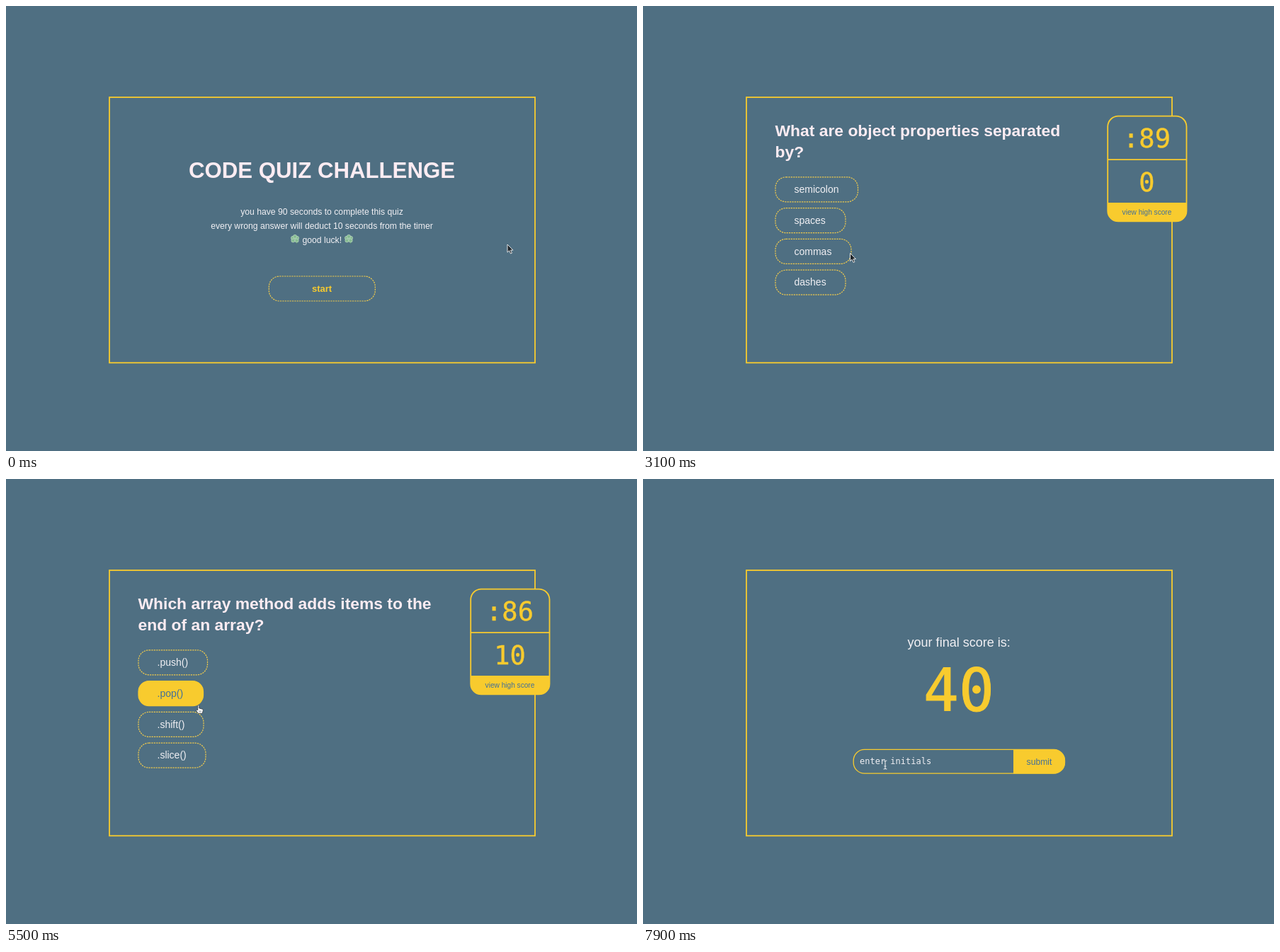
These frames come from a looping animation (891 px wide and 629 px high, 8 s). An HTML page:

```html
<!DOCTYPE html>
<html lang="en">
<head>
<meta charset="utf-8">
<title>Code quiz</title>
<style>
  html, body { margin: 0; width: 100%; height: 100%; overflow: hidden; background: #4f6f82; }
  svg { display: block; width: 891px; height: 629px; font-family: "Liberation Sans", Arial, sans-serif; cursor: default; }
  text { fill: #f1f0f4; white-space: pre; }
  .bold { font-weight: 700; }
  .head { fill: #fcecf2; }
  .gold { fill: #f8cb2e; }
  .blue { fill: #42709a; }
  .note { fill: #f8cb2e; font-weight: 700; font-style: italic; }
  .mono { font-family: "DejaVu Sans Mono", monospace; }
  .digits { fill: #f8cb2e; stroke: #f8cb2e; stroke-width: .012em; }
  .line { fill: none; stroke: #f8cb2e; stroke-width: 1.8; }
  .btn rect { fill: none; stroke: #f0ca4c; stroke-width: 1.2; stroke-dasharray: 2.2 1.2; }
  .btn.on rect { fill: #f8cb2e; stroke: #f8cb2e; stroke-dasharray: none; }
  .btn.on text { fill: #42709a; }
</style>
</head>
<body>
<svg id="stage" viewBox="0 0 891 629">
  <rect class="line" x="146" y="129" width="601" height="375.3"/>
  <g id="intro"></g>
  <g id="first"></g>
  <g id="second"></g>
  <g id="panel"></g>
  <g id="final"></g>
  <g id="arrow"><path d="M0 0V11.2L2.6 8.8 4.5 13 6.4 12.2 4.6 8.1H8Z" fill="#20262b" stroke="#f4f4f4" stroke-width=".9"/></g>
  <g id="hand"><path d="M-1 1Q0-.6 1 1V4.6L5.6 5.8Q6.8 6.2 6.4 8L5.4 12H-.4L-3.6 7.4Q-3.4 5.8-1 7.4Z" fill="#fff" stroke="#30383e" stroke-width=".8"/><path d="M1.2 8V10.4M3.2 8V10.4" stroke="#30383e" stroke-width=".6"/></g>
  <g id="beam"><path d="M-2.4-6Q0-6 0-4.4 0-6 2.4-6M0-4.6V4.6M-2.4 6Q0 6 0 4.4 0 6 2.4 6M-1.5 2H1.5" fill="none" stroke="#e8eaec" stroke-width="1.1"/></g>
</svg>
<script>
const LOOP = 8000, STEP = 100;
const $ = id => document.getElementById(id);

const text = (x, y, size, str, cls = '', anchor = 'start', id = '') =>
  `<text x="${x}" y="${y}" font-size="${size}" class="${cls}" text-anchor="${anchor}" id="${id}">${str.replace(/>/g, '&gt;')}</text>`;

const button = (id, x, y, w, label) =>
  `<g class="btn" id="${id}"><rect x="${x}" y="${y}" width="${w}" height="35" rx="15"/>${label}</g>`;

const clover = x => `<g transform="translate(${x} 329.5)">
  <path d="M0 0Q1 4 3 6" stroke="#5d9a6c" stroke-width="1.3" fill="none"/>` +
  [[-3, -1.6], [3, -1.6], [0, -3.6], [-2.6, 2], [2.6, 2]]
    .map(([a, b]) => `<circle cx="${a}" cy="${b}" r="2.6" fill="#86bb92" stroke="#d3e6d5" stroke-width=".5"/>`).join('') + '</g>';

const face = (x, mouth) => `<g transform="translate(${x} 433) skewX(-12)">
  <circle r="6.4" fill="#f6c443"/>
  <path d="M-4-1Q-2.6 .6-1.2-1M1.6-1Q3 .6 4.4-1M-2 ${mouth}" fill="none" stroke="#6b4a22" stroke-width="1.1"/></g>`;

const question = (lines, prefix, options) =>
  lines.map((s, i) => text(186.5, 183.6 + i * 30, 22.87, s, 'bold head')).join('') +
  options.map(([s, w], i) => {
    const y = 241.8 + i * 43.8;
    return button(prefix + i, 187, y, w, text(213.5, y + 22.2, 14, s));
  }).join('');

$('intro').innerHTML =
  text(446, 243.3, 31.2, 'CODE QUIZ CHALLENGE', 'bold head', 'middle') +
  text(446, 294.8, 12.2, 'you have 90 seconds to complete this quiz', '', 'middle') +
  text(446, 314.8, 12.2, 'every wrong answer will deduct 10 seconds from the timer', '', 'middle') +
  text(446.3, 334.6, 12.2, 'good luck!', '', 'middle') + clover(408) + clover(484) +
  button('start', 371.3, 382, 150, text(446, 403.7, 13, 'start', 'bold gold', 'middle'));

$('first').innerHTML =
  question(['What are object properties separated', 'by?'], 'a',
    [['semicolon', 116.5], ['spaces', 99], ['commas', 107], ['dashes', 99]]) +
  `<g id="right">${text(198, 438.3, 15.2, '>>> correct!!', 'note')}${face(303, '2Q0 5 2.4 2')}</g>`;

$('second').innerHTML =
  question(['Which array method adds items to the', 'end of an array?'], 'b',
    [['.push()', 97.5], ['.pop()', 91.5], ['.shift()', 92], ['.slice()', 95]]) +
  `<g id="wrong">${text(201.5, 438.3, 15.3, '>>> wrong!!', 'note')}${face(301.5, '4Q0 2 2.4 4')}</g>`;

$('panel').innerHTML =
  `<rect x="656.2" y="155.6" width="111.3" height="148.8" rx="15" fill="#4f6f82"/>
   <path class="gold" d="M656 278H768V290A15 15 0 0 1 753 305H671A15 15 0 0 1 656 290Z"/>
   <rect class="line" x="656.2" y="155.6" width="111.3" height="148.8" rx="15"/>
   <path class="line" d="M656 217.2H767.5"/>` +
  text(711.5, 200.3, 37, '', 'mono digits', 'middle', 'timer') +
  text(711.5, 262, 37, '', 'mono digits', 'middle', 'score') +
  text(711.5, 294.7, 10.15, 'view high score', 'blue', 'middle');

$('final').innerHTML =
  text(446.2, 237.2, 18.05, 'your final score is:', '', 'middle') +
  text(446, 327.6, 83, '40', 'mono digits', 'middle') +
  `<path class="gold" d="M523 382H580A16 16 0 0 1 596 398V400.5A16 16 0 0 1 580 416.5H523Z"/>
   <rect class="line" x="297.2" y="382.4" width="298.3" height="33.8" rx="15.5" style="stroke-width:1.3"/>` +
  text(306, 403.2, 12, 'enter initials', 'mono') +
  text(559.5, 403.6, 12.2, 'submit', 'blue', 'middle');

// Pointer path: time, x, y
const path = [
  [0, 708, 337], [400, 545, 385], [700, 500, 400], [1700, 500, 400],
  [2200, 489, 392], [2600, 459, 378], [3100, 292.5, 349.5], [3300, 266, 350],
  [4000, 266, 350], [4500, 269, 351], [4700, 269, 351], [4800, 289.5, 353],
  [5100, 291, 349], [5600, 267, 312], [5700, 265, 309], [6300, 265, 309],
  [6400, 245, 399], [6600, 245, 399], [7000, 248, 402], [7200, 248, 402],
  [7600, 304, 402], [7900, 342, 404]
];
const shapes = [[0, 'arrow'], [500, 'hand'], [1800, 'arrow'], [3200, 'hand'],
  [4800, 'arrow'], [5400, 'hand'], [6400, 'arrow'], [7600, 'beam']];

// Visible and hovered spans: id, from, to
const spans = [['intro', 0, 1500], ['first', 1500, 4000], ['second', 4000, 6400],
  ['panel', 1500, 6400], ['final', 6400, LOOP], ['right', 3500, 4000], ['wrong', 5900, 6400]];
const hovers = [['start', 500, 1500], ['a2', 3200, 4000], ['b2', 4000, 4800], ['b1', 5400, 6400]];

const within = (t, from, to) => t >= from && t < to;

function pointerAt(t) {
  const i = path.findIndex(k => k[0] > t);
  if (i < 0) return path[path.length - 1].slice(1);
  const [t0, x0, y0] = path[i - 1], [t1, x1, y1] = path[i];
  const p = (t - t0) / (t1 - t0);
  return [x0 + (x1 - x0) * p, y0 + (y1 - y0) * p];
}

function draw(t) {
  for (const [id, from, to] of spans) $(id).style.display = within(t, from, to) ? '' : 'none';
  for (const [id, from, to] of hovers) $(id).classList.toggle('on', within(t, from, to));
  $('timer').textContent = ':' + (90 - Math.max(0, Math.floor((t - 1500) / 1000)));
  $('score').textContent = t < 3500 ? '0' : '10';
  const [x, y] = pointerAt(t);
  const shape = shapes.filter(s => s[0] <= t).pop()[1];
  for (const id of ['arrow', 'hand', 'beam']) {
    $(id).style.display = id === shape ? '' : 'none';
    $(id).setAttribute('transform', `translate(${x} ${y})`);
  }
}

const begin = performance.now();
function tick() {
  const t = (performance.now() - begin) % LOOP;
  draw(Math.floor(t / STEP) * STEP);
  requestAnimationFrame(tick);
}
tick();
</script>
</body>
</html>
```
